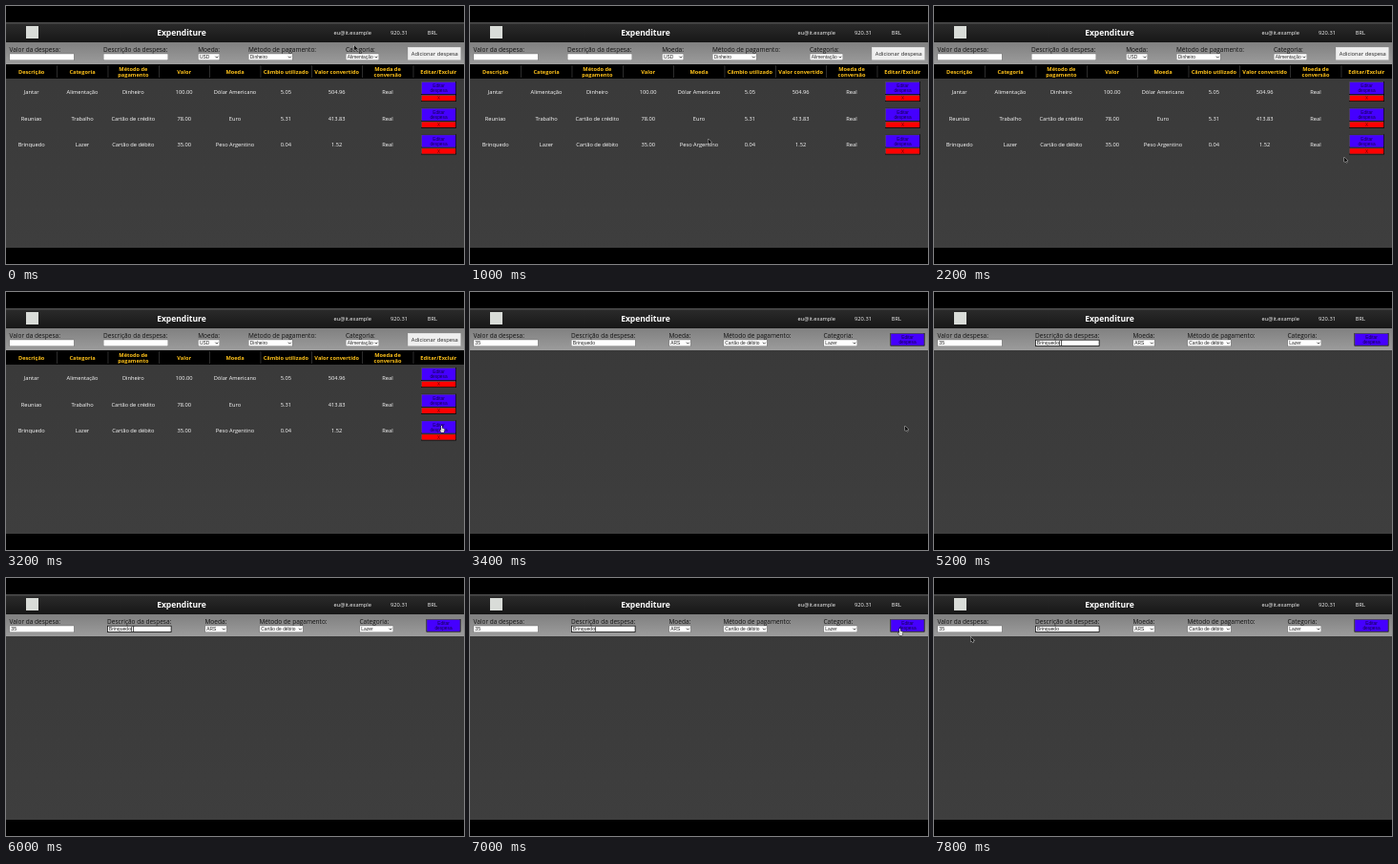
An HTML page with a canvas that plays this animation: 480 by 270 pixels, repeating every 8 s.

```html
<!DOCTYPE html>
<html lang="pt">
<head>
<meta charset="utf-8">
<title>Expenditure</title>
<style>
html, body { margin: 0; width: 100%; height: 100%; overflow: hidden; background: #000; }
canvas { display: block; width: 480px; height: 270px; }
</style>
</head>
<body>
<canvas width="480" height="270"></canvas>
<script>
const ctx = document.querySelector('canvas').getContext('2d');
const UI = '"Open Sans", "Noto Sans", sans-serif';
const FORM = '"Liberation Sans", Arial, sans-serif';
const LOOP = 8000, STEP = 200, EDIT_AT = 3400, FOCUS_AT = 5000;
const COLUMN = 480 / 9;

const headings = ['Descrição', 'Categoria', 'Método de|pagamento', 'Valor', 'Moeda',
  'Câmbio utilizado', 'Valor convertido', 'Moeda de|conversão', 'Editar/Excluir'];
const expenses = [
  ['Jantar', 'Alimentação', 'Dinheiro', '100.00', 'Dólar Americano', '5.05', '504.96', 'Real'],
  ['Reuniao', 'Trabalho', 'Cartão de crédito', '78.00', 'Euro', '5.31', '413.83', 'Real'],
  ['Brinquedo', 'Lazer', 'Cartão de débito', '35.00', 'Peso Argentino', '0.04', '1.52', 'Real']
];

// label, x, control width, value, is a select
const addForm = [
  ['Valor da despesa:', 3.5, 68, '', false],
  ['Descrição da despesa:', 102, 68, '', false],
  ['Moeda:', 201.2, 22.8, 'USD', true],
  ['Método de pagamento:', 254, 46.5, 'Dinheiro', true],
  ['Categoria:', 356, 35, 'Alimentação', true]
];
const editForm = [
  ['Valor da despesa:', 3.5, 68, '35', false],
  ['Descrição da despesa:', 106, 67.5, 'Brinquedo', false],
  ['Moeda:', 208.5, 23, 'ARS', true],
  ['Método de pagamento:', 265.5, 46, 'Cartão de débito', true],
  ['Categoria:', 370.5, 35.5, 'Lazer', true]
];

// time, x, y of the pointer
const pointerPath = [
  [0, 365, 41], [200, 363, 45], [1000, 249.5, 139], [1400, 249.5, 139],
  [2200, 430, 158], [2600, 430, 158], [3200, 456, 140], [3600, 456, 140],
  [4200, 37, 58], [4400, 37, 58], [4800, 133, 59], [5000, 133.5, 53.5],
  [6200, 133.5, 53.5], [6800, 457, 53], [7000, 450, 53], [7200, 401, 53],
  [7800, 38.5, 61.5], [8000, 38.5, 61.5]
];

function rect(x, y, w, h, color) {
  ctx.fillStyle = color;
  ctx.fillRect(x, y, w, h);
}

function gradient(y, h, from, to) {
  const fill = ctx.createLinearGradient(0, y, 0, y + h);
  fill.addColorStop(0, from);
  fill.addColorStop(1, to);
  rect(0, y, 480, h, fill);
}

function text(str, x, y, size, color, { align = 'left', font = UI, weight = 500 } = {}) {
  ctx.font = `${weight} ${size}px ${font}`;
  ctx.textAlign = align;
  ctx.fillStyle = color;
  ctx.fillText(str, x, y);
}

const centered = (str, x, y, size, color, options) =>
  text(str, x, y, size, color, { align: 'center', ...options });

function button(x, y, w, h, color, light = '#4c4c4c', dark = '#000') {
  rect(x, y, w, h, dark);
  rect(x, y, w - 0.8, h - 0.8, light);
  rect(x + 0.8, y + 0.8, w - 1.6, h - 1.6, color);
}

function editButton(x, y, w, h) {
  button(x, y, w, h, '#4500ff');
  centered('Editar', x + w / 2, y + h / 2 - 0.9, 4.8, '#12004a', { font: FORM });
  centered('despesa', x + w / 2, y + h / 2 + 4.3, 4.8, '#12004a', { font: FORM });
}

function field([label, x, w, value, isSelect], focused) {
  text(label, x, 47.5, 6.5, '#111');
  rect(x, 49.8, w, 7.1, focused ? '#111' : '#666');
  const edge = focused ? 0.8 : 0.4;
  rect(x + edge, 49.8 + edge, w - 2 * edge, 7.1 - 2 * edge, '#fff');
  text(value, x + 1.8, 55.2, isSelect ? 4.9 : 5.1, '#222', { font: FORM });
  if (isSelect) {
    ctx.strokeStyle = '#222';
    ctx.lineWidth = 0.8;
    ctx.beginPath();
    ctx.moveTo(x + w - 4.6, 52.7);
    ctx.lineTo(x + w - 3.1, 54.2);
    ctx.lineTo(x + w - 1.6, 52.7);
    ctx.stroke();
  }
}

function drawHeader() {
  gradient(17, 21, '#2c2c2c', '#171717');
  rect(0, 17, 480, 1.6, '#4a4a4a');
  rect(21, 21, 13, 13, '#d9dcd8');
  centered('Expenditure', 184, 31, 8.5, '#fff', { weight: 700 });
  centered('eu@it.example', 363.3, 30.4, 5.7, '#f4f4f4');
  centered('920.31', 412, 30.4, 5.7, '#f4f4f4');
  centered('BRL', 446.8, 30.4, 5.7, '#f4f4f4');
}

function drawTable() {
  rect(0, 61, 480, 15, '#000');
  headings.forEach((heading, i) => {
    const x = (i + 0.5) * COLUMN;
    const lines = heading.split('|');
    lines.forEach((line, n) =>
      centered(line, x, 70.8 + (n - (lines.length - 1) / 2) * 6.6, 5.65, '#ffc21a', { weight: 700 }));
    if (i) rect(i * COLUMN, 62, 0.6, 13, '#4a4a4a');
  });
  expenses.forEach((row, r) => {
    const y = 79 + r * 27.7;
    row.forEach((cell, i) => centered(cell, (i + 0.5) * COLUMN, y + 13, 5.7, '#fff'));
    editButton(435, y, 37, 14);
    button(435, y + 14, 37, 7, '#f00');
    centered('X', 453.5, y + 19.2, 4.6, '#600', { font: FORM });
  });
}

function pointerAt(t) {
  const next = Math.max(1, pointerPath.findIndex(p => p[0] > t));
  const [t0, x0, y0] = pointerPath[next - 1];
  const [t1, x1, y1] = pointerPath[next];
  const u = (t - t0) / (t1 - t0);
  const k = u * u * (3 - 2 * u);
  return [x0 + (x1 - x0) * k, y0 + (y1 - y0) * k];
}

function shape(path, fill, stroke) {
  const outline = new Path2D(path);
  ctx.lineWidth = 0.8;
  ctx.strokeStyle = stroke;
  ctx.stroke(outline);
  ctx.fillStyle = fill;
  ctx.fill(outline);
}

function drawPointer(t, editing) {
  const [x, y] = pointerAt(t);
  const overText = editing && y > 50 && y < 57 && x > 106 && x < 173;
  const overTableButton = !editing && x > 435 && x < 472 && y > 79 && y < 156;
  const overSubmit = editing && x > 440 && x < 477 && y > 43 && y < 57;
  ctx.save();
  ctx.translate(x, y);
  if (overText) {
    shape('M-1-2.8H1M0-2.8V2.8M-1 2.8H1', '#333', '#333');
  } else if (overTableButton || overSubmit) {
    shape('M0 0H1V2.5L3.5 3.2V5L2.8 7H0L-1.3 4.2L0 4.4Z', '#ddd', '#111');
  } else {
    shape('M0 0V5.2L1.2 4.2L2 6L3 5.6L2.2 3.9H3.8Z', '#111', '#ddd');
  }
  ctx.restore();
}

function draw(t) {
  const editing = t >= EDIT_AT;
  const focused = t >= FOCUS_AT;
  rect(0, 0, 480, 270, '#000');
  gradient(38, 215, '#393939', '#3e3e3e');
  drawHeader();
  gradient(38, 23, '#808080', '#9c9c9c');
  (editing ? editForm : addForm).forEach((item, i) => field(item, focused && i === 1));
  if (editing) {
    editButton(440.5, 43, 36, 13.5);
    if (focused && (t - FOCUS_AT) % 1000 < 500) rect(131.2, 51.2, 0.7, 4.6, '#111');
  } else {
    button(421, 43, 56, 14, '#efefef', '#ddd', '#aaa');
    centered('Adicionar despesa', 449.3, 52.2, 5.75, '#222');
    drawTable();
  }
  drawPointer(t, editing);
}

function tick() {
  draw(Math.floor(performance.now() % LOOP / STEP) * STEP);
  requestAnimationFrame(tick);
}
tick();
</script>
</body>
</html>
```
